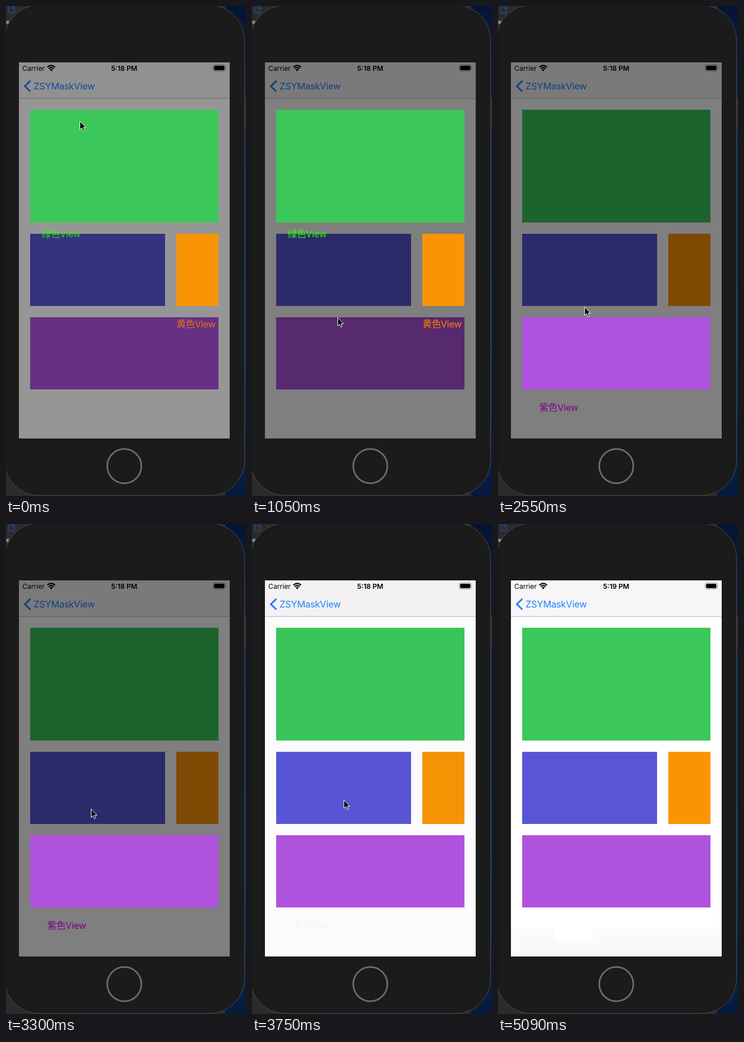
Recreate the animation shown at these times as an HTML page. Size 427 by 869 pixels, loop 6.59 s.

```html
<!DOCTYPE html>
<html lang="zh-CN">
<head>
<meta charset="utf-8">
<title>Mask view</title>
<style>
  html, body { margin: 0; width: 100%; height: 100%; overflow: hidden; background: #1b1b1b; }
  svg { display: block; width: 100%; height: 100%; }
  text { font-family: Inter, 'Noto Sans CJK SC', 'Noto Sans CJK', sans-serif; }
  .status { font-size: 12.2px; }
  .title { font-size: 16.4px; letter-spacing: -.25px; }
  .label { font-size: 16.5px; letter-spacing: -.35px; }
</style>
</head>
<body>
<svg viewBox="0 0 427 869">
  <defs>
    <linearGradient id="sky" x1="0" y1="0" x2="0" y2="1">
      <stop offset="0" stop-color="#061433"/>
      <stop offset=".3" stop-color="#0a2c5c"/>
      <stop offset=".7" stop-color="#0b3566"/>
      <stop offset="1" stop-color="#061a3c"/>
    </linearGradient>
  </defs>

  <!-- desktop -->
  <rect width="427" height="869" fill="#2b2b2c"/>
  <rect x="390" width="37" height="869" fill="url(#sky)"/>
  <path d="M5 -1V12H15V3L11 -1M10 -1V4H15" fill="none" stroke="#204f98" stroke-width="1.3"/>
  <text x="-3" y="32" font-size="11" font-weight="700" fill="#c8c8c8" style="font-family:'Noto Serif',serif">w</text>

  <!-- phone -->
  <rect x="422" y="162" width="8" height="59" rx="1" fill="#343434" stroke="#151515"/>
  <rect x="-3" y="-1.5" width="427.5" height="869.5" rx="62" fill="#1b1b1b" stroke="#4b4b4c"/>
  <circle cx="210.5" cy="816" r="30.3" fill="#1b1b1b" stroke="#6e6e6e" stroke-width="2.8"/>

  <!-- screen -->
  <rect x="23" y="100" width="375" height="667" fill="#fff"/>
  <rect x="23" y="100" width="375" height="64" fill="#f7f5f8"/>
  <rect x="23" y="163.6" width="375" height="1" fill="#b8b7ba"/>
  <text class="status" x="29" y="114.6">Carrier</text>
  <g fill="none" stroke="#000" stroke-width="2.1">
    <path d="M73.6 108.4Q80.5 102.2 87.4 108.4"/>
    <path d="M76 111.2Q80.5 107.2 85 111.2"/>
  </g>
  <path d="M77.8 112.9Q80.5 110.6 83.2 112.9L80.5 115.7Z"/>
  <text class="status" id="clock" x="210.3" y="114.6" font-weight="600" text-anchor="middle"></text>
  <rect x="368.5" y="104.5" width="21.6" height="10.8" rx="3" fill="none" stroke="#8e8e90"/>
  <rect x="370.2" y="106.1" width="18.3" height="7.6" rx="1.6"/>
  <path d="M391.2 108.2Q392.8 109.9 391.2 111.6Z" fill="#8e8e90"/>
  <path d="M43.4 132.6L33.6 142.2L43.4 151.8" fill="none" stroke="#1f82fb" stroke-width="3"/>
  <text class="title" x="49" y="148" fill="#1f82fb">ZSYMaskView</text>
  <g id="boxes"></g>
  <path id="footer" fill="#fafafa"/>
  <path id="dim" fill-rule="evenodd"/>
  <g id="labelsA">
    <text class="label" x="63.5" y="410" fill="#2bff00">绿色View</text>
    <text class="label" x="303.5" y="570" fill="#ff8000">黄色View</text>
  </g>
  <g id="labelsB">
    <text class="label" x="73.5" y="718" fill="#800080">紫色View</text>
  </g>
  <path id="cursor" d="M.5 .5V15.3L3.9 12.2L6.2 17.5L8.6 16.5L6.4 11.3H11Z" stroke="#fff" stroke-linejoin="round"/>
</svg>
<script>
const LOOP = 6590, STEP = 150;
const $ = id => document.getElementById(id);

const boxes = {
  green: [43, 184, 335, 200, '#3bc75a'],
  blue: [43, 404, 240, 128, '#5856d6'],
  orange: [303, 404, 75, 128, '#f99504'],
  purple: [43, 552, 335, 128, '#af52de']
};
const rectPath = ([x, y, w, h]) => `M${x} ${y}h${w}v${h}h${-w}z`;
$('boxes').innerHTML = Object.values(boxes)
  .map(b => `<path d="${rectPath(b)}" fill="${b[4]}"/>`).join('');

const screenPath = rectPath([23, 100, 375, 667]);
const holes = (...names) => screenPath + names.map(n => rectPath(boxes[n])).join('');
const maskA = holes('green', 'orange'), maskB = holes('purple');
const footer = rectPath([23, 718, 375, 49]);
const footerCut = 'M23 718H101V738H168V718H398V767H23Z';

// [time, x, y]
const cursorKeys = [
  [0, 131, 204], [1050, 152, 552], [2100, 152, 552], [2700, 154, 530],
  [3150, 151, 508], [3300, 151, 505], [3600, 151, 505], [3750, 163, 489],
  [4350, 157, 719], [4790, 101, 400], [4940, 75, 139]
];
// [time, opacity]
const dimKeys = [[0, .41], [150, .5], [3450, .5], [3600, .145], [3750, .016], [3900, 0]];

function sample(keys, t) {
  const i = keys.findIndex(k => k[0] > t);
  if (i < 0) return keys[keys.length - 1].slice(1);
  const a = keys[i - 1], b = keys[i];
  const p = (t - a[0]) / (b[0] - a[0]), e = p * p * (3 - 2 * p);
  return a.slice(1).map((v, j) => v + (b[j + 1] - v) * e);
}

function tick(t) {
  const start = t < 4790 ? 0 : 4790;
  const q = start + Math.floor((t - start) / STEP) * STEP;
  return start ? q : Math.min(q, 4350);
}

function draw(time) {
  const t = tick(time);
  const [dim] = sample(dimKeys, t), [x, y] = sample(cursorKeys, t);
  const second = t >= 1650;
  $('dim').setAttribute('d', second ? maskB : maskA);
  $('dim').setAttribute('opacity', dim);
  $('labelsA').setAttribute('opacity', second ? 0 : dim * 2);
  $('labelsB').setAttribute('opacity', second ? dim * 2 : 0);
  $('footer').setAttribute('d', t < 3900 ? '' : t < 4790 ? footer : footerCut);
  $('clock').textContent = t < 4050 ? '5:18 PM' : '5:19 PM';
  $('cursor').setAttribute('transform', `translate(${x} ${y})`);
  $('cursor').setAttribute('opacity', t < 5090 ? 1 : 0);
}

const begin = performance.now();
function frame() {
  draw((performance.now() - begin) % LOOP);
  requestAnimationFrame(frame);
}
frame();
</script>
</body>
</html>
```
